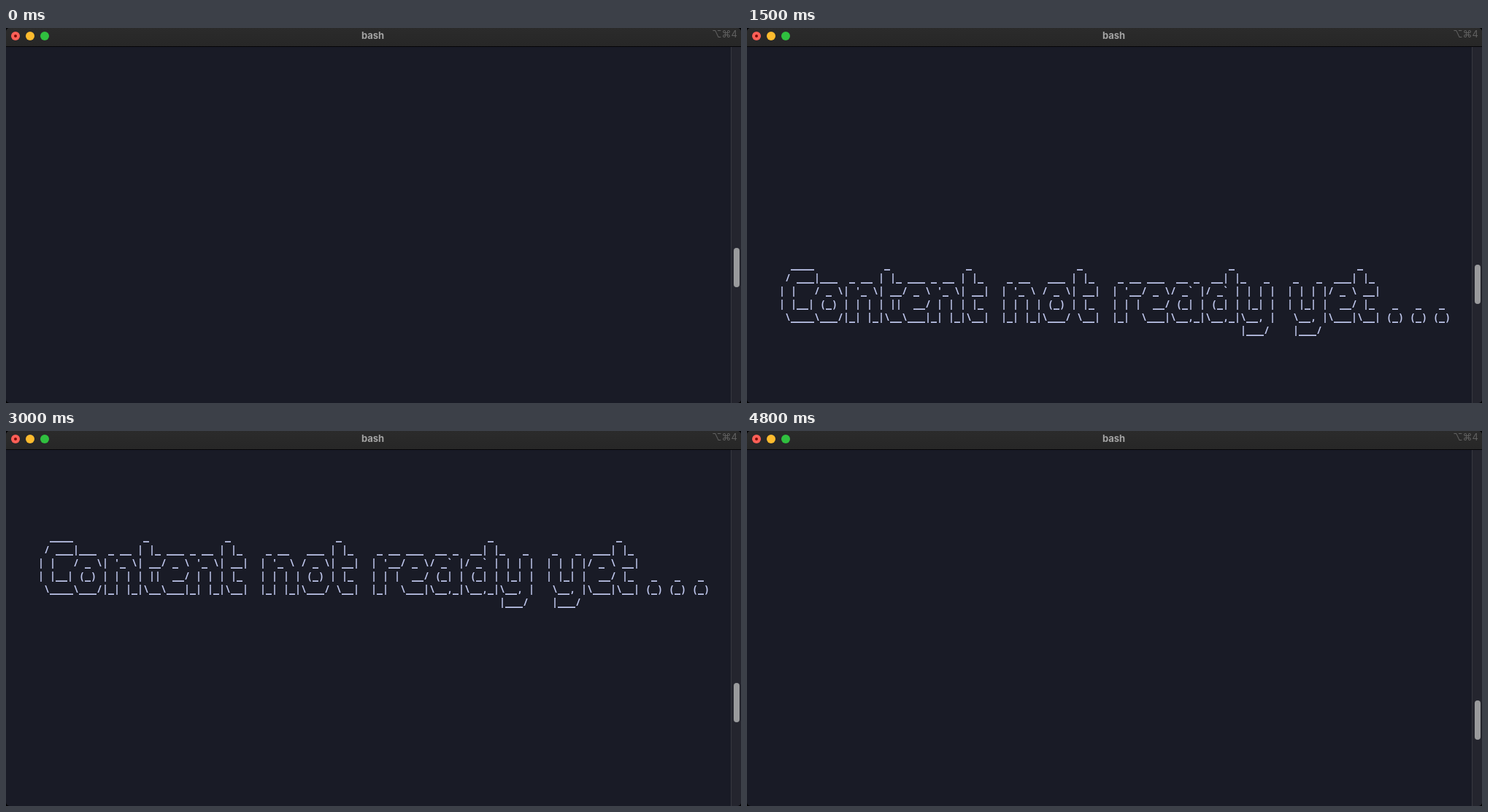
These frames come from a looping animation (1007x515 px, 5.1 s). An HTML page with a canvas:

```html
<!DOCTYPE html>
<html lang="en">
<head>
<meta charset="utf-8">
<title>bash</title>
<style>
  html, body { margin: 0; width: 100%; height: 100%; overflow: hidden; background: #000; }
  canvas { display: block; width: 1007px; height: 515px; }
</style>
</head>
<body>
<canvas id="stage" width="1007" height="515"></canvas>
<script>
const W = 1007, H = 515;
const ctx = document.getElementById('stage').getContext('2d');

const STEP = 300, STEPS = 17;
const CELL = 8, LINE = 18, LEFT = 44;
const FIRST_RULE = 511; // underscore top of the first banner row at step 0
const MONO = '600 13.333px "Noto Sans Mono", "DejaVu Sans Mono", monospace';
const UI = 'Inter, "DejaVu Sans", sans-serif';

const banner = String.raw`
  ____            _             _                  _                         _                     _
 / ___|___  _ __ | |_ ___ _ __ | |_    _ __   ___ | |_    _ __ ___  __ _  __| |_   _    _   _  ___| |_
| |   / _ \| '_ \| __/ _ \ '_ \| __|  | '_ \ / _ \| __|  | '__/ _ \/ _~ |/ _~ | | | |  | | | |/ _ \ __|
| |__| (_) | | | | ||  __/ | | | |_   | | | | (_) | |_   | | |  __/ (_| | (_| | |_| |  | |_| |  __/ |_   _   _   _
 \____\___/|_| |_|\__\___|_| |_|\__|  |_| |_|\___/ \__|  |_|  \___|\__,_|\__,_|\__, |   \__, |\___|\__| (_) (_) (_)
                                                                               |___/    |___/
`.replaceAll('~', '`').split('\n').slice(1, -1);

const thumbTops = [302, 308, 313, 316, 320, 325, 329, 332, 337,
                   341, 346, 350, 353, 358, 362, 365, 370];

function rect(x, y, w, h, color) {
  ctx.fillStyle = color;
  ctx.fillRect(x, y, w, h);
}

function dot(x, y, r, color) {
  ctx.fillStyle = color;
  ctx.beginPath();
  ctx.arc(x, y, r, 0, Math.PI * 2);
  ctx.fill();
}

function label(text, x, y, font, color, align) {
  ctx.font = font;
  ctx.fillStyle = color;
  ctx.textAlign = align;
  ctx.fillText(text, x, y);
}

function drawTitleBar() {
  const shade = ctx.createLinearGradient(0, 0, 0, 25);
  shade.addColorStop(0, '#2b2b2b');
  shade.addColorStop(1, '#272727');
  rect(0, 0, W, 25, shade);
  rect(0, 25, W, 1, '#050507');
  dot(13, 11, 6, '#ff5f57');
  dot(13, 11, 2, '#7d0a06');
  dot(33, 11, 6, '#fdbb2e');
  dot(53, 11, 6, '#30c03f');
  label('bash', 502.5, 15, `bold 13px ${UI}`, '#a3a3a3', 'center');
  label('⌥⌘4', 1002, 13, `13px ${UI}`, '#616161', 'right');
}

function drawScrollbar(step) {
  rect(993, 26, 14, H - 26, '#24252e');
  rect(993, 26, 1, H - 26, '#373841');
  ctx.fillStyle = '#999a9c';
  ctx.beginPath();
  ctx.roundRect(997, thumbTops[step], 8, 54, 4);
  ctx.fill();
}

function drawBanner(step) {
  if (step === 0) return;
  ctx.save();
  ctx.beginPath();
  ctx.rect(0, 29, 993, H - 29);
  ctx.clip();
  ctx.font = MONO;
  ctx.textAlign = 'left';
  ctx.fillStyle = '#c0c8ee';
  // Put the underscore's top edge on each row's rule.
  const rise = Math.round(ctx.measureText('_').actualBoundingBoxAscent);
  banner.forEach((row, i) => {
    const y = FIRST_RULE + (i - 2 * step) * LINE + rise;
    [...row].forEach((char, col) => {
      if (char !== ' ') ctx.fillText(char, LEFT + col * CELL, y);
    });
  });
  ctx.restore();
}

function draw(now) {
  const step = Math.floor(now / STEP) % STEPS;
  rect(0, 0, W, H, '#000');
  ctx.save();
  ctx.beginPath();
  ctx.roundRect(0, 0, W, H, 5);
  ctx.clip();
  rect(0, 0, W, H, '#191b26');
  drawBanner(step);
  drawScrollbar(step);
  drawTitleBar();
  ctx.restore();
}

const start = performance.now();
function tick() {
  draw(performance.now() - start);
  requestAnimationFrame(tick);
}
tick();
</script>
</body>
</html>
```
